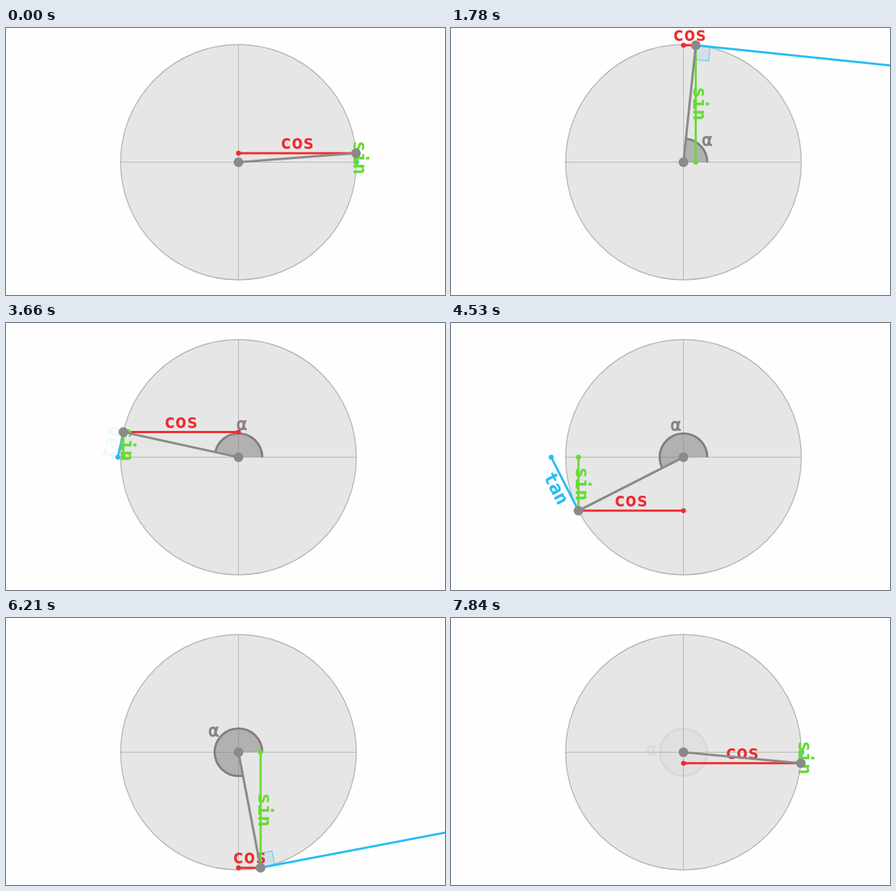
An HTML page with a canvas that plays this animation: 609x371 px, repeating every 7960 ms.

```html
<!DOCTYPE html>
<html lang="en">
<head>
<meta charset="utf-8">
<title>Unit circle: sin, cos, tan</title>
<style>
  html, body { margin: 0; width: 100%; height: 100%; overflow: hidden; background: #fefefe; }
  canvas { display: block; }
</style>
</head>
<body>
<canvas id="stage" width="609" height="371"></canvas>
<script>
const ctx = document.getElementById('stage').getContext('2d');
const LOOP = 7960, CX = 322.5, CY = 186.5, R = 163.5, TAU = Math.PI * 2;
const RED = '#ef2b2f', GREEN = '#67db36', BLUE = '#25bdf5', GRAY = '#8b8a89';

// [step, time in ms]; the steps between two entries are evenly spaced
const timing = [
  [0, 0], [1, 100], [7, 780], [8, 900], [15, 1660], [16, 1780], [17, 1900],
  [23, 2550], [24, 2660], [25, 2760], [26, 2880], [31, 3420], [32, 3540],
  [39, 4310], [40, 4430], [41, 4530], [42, 4650], [47, 5190], [48, 5310],
  [50, 5560], [51, 5650], [55, 6090], [56, 6210], [62, 6870], [63, 6980],
  [64, 7080], [71, 7840], [72, LOOP]
];

const clamp = v => Math.max(0, Math.min(1, v));

function stepAt(time) {
  const next = timing.findIndex(entry => entry[1] > time);
  const [s0, t0] = timing[next - 1], [s1, t1] = timing[next];
  return Math.floor(s0 + (s1 - s0) * (time - t0) / (t1 - t0) + 1e-6);
}

function line(x1, y1, x2, y2, color, width = 3) {
  ctx.strokeStyle = color;
  ctx.lineWidth = width;
  ctx.beginPath();
  ctx.moveTo(x1, y1);
  ctx.lineTo(x2, y2);
  ctx.stroke();
}

function dot(x, y, color, radius = 3.4) {
  ctx.fillStyle = color;
  ctx.beginPath();
  ctx.arc(x, y, radius, 0, TAU);
  ctx.fill();
}

// (x, y) is the anchor on the line, lift is the baseline's distance above it
function label(text, x, y, lift, color, rotation = 0, size = 26) {
  ctx.save();
  ctx.translate(x, y);
  ctx.rotate(rotation);
  ctx.font = `bold ${size}px "DejaVu Sans Mono", monospace`;
  ctx.textAlign = 'center';
  ctx.fillStyle = color;
  ctx.fillText(text, 0, -lift);
  ctx.restore();
}

function drawGrid() {
  ctx.globalAlpha = 1;
  ctx.fillStyle = '#fefefe';
  ctx.fillRect(0, 0, 609, 371);
  dot(CX, CY, '#e6e6e6', R);
  ctx.strokeStyle = '#b5b5b5';
  ctx.lineWidth = 1.4;
  ctx.stroke();
  line(CX - R, CY, CX + R, CY, '#b5b5b5', 1);
  line(CX, CY - R, CX, CY + R, '#b5b5b5', 1);
}

function drawAngle(angle, opacity) {
  ctx.globalAlpha = opacity;
  ctx.beginPath();
  ctx.moveTo(CX, CY);
  ctx.arc(CX, CY, 33, 0, -angle, true);
  ctx.fillStyle = 'rgba(128,126,126,.5)';
  ctx.fill();
  ctx.beginPath();
  ctx.arc(CX, CY, 33, 0, -angle, true);
  ctx.strokeStyle = '#827e7d';
  ctx.lineWidth = 3;
  ctx.stroke();
  label('α', CX + 44.5 * Math.cos(angle / 2), CY - 44.5 * Math.sin(angle / 2), -7, '#8a8281', 0, 25);
  ctx.globalAlpha = 1;
}

function drawTangent(angle, x, y) {
  const cos = Math.cos(angle), sin = Math.sin(angle), slope = Math.abs(sin / cos);
  const endX = CX + R / cos;
  const side = 20 * Math.sign(sin * cos);
  const tx = sin * side, ty = cos * side;
  const nx = -cos * 20, ny = sin * 20;

  // right-angle marker
  ctx.globalAlpha = clamp((slope - 0.6) / 0.7);
  ctx.beginPath();
  ctx.moveTo(x, y);
  ctx.lineTo(x + tx, y + ty);
  ctx.lineTo(x + tx + nx, y + ty + ny);
  ctx.lineTo(x + nx, y + ny);
  ctx.closePath();
  ctx.fillStyle = 'rgba(37,189,245,.13)';
  ctx.fill();
  ctx.strokeStyle = 'rgba(37,189,245,.5)';
  ctx.lineWidth = 1.5;
  ctx.stroke();

  ctx.globalAlpha = 1;
  line(x, y, endX, CY, BLUE);
  dot(endX, CY, BLUE);

  ctx.globalAlpha = clamp((slope - 0.2) / 0.25);
  const rotation = Math.atan(cos / sin);
  label('tan', (x + endX) / 2 + 14 * cos, (y + CY) / 2 - 14 * sin, -8, BLUE, rotation);
  ctx.globalAlpha = 1;
}

function draw() {
  const step = stepAt(performance.now() % LOOP);
  const angle = (step ? 5.3 + 4.92 * step : 4.4) * Math.PI / 180;
  const x = CX + R * Math.cos(angle), y = CY - R * Math.sin(angle);

  drawGrid();
  drawAngle(angle, clamp(Math.min(step / 3, (71.3 - step) / 3)));
  drawTangent(angle, x, y);

  line(CX, y, x, y, RED);
  dot(CX, y, RED);
  label('cos', (CX + x) / 2, y, 6, RED);

  line(x, CY, x, y, GREEN);
  dot(x, CY, GREEN);
  label('sin', x, (CY + y) / 2, -3.5 + 0, GREEN, Math.PI / 2) ;

  line(CX, CY, x, y, GRAY, 3.2);
  dot(CX, CY, GRAY, 6.7);
  dot(x, y, GRAY, 6.7);
  requestAnimationFrame(draw);
}
draw();
</script>
</body>
</html>
```
